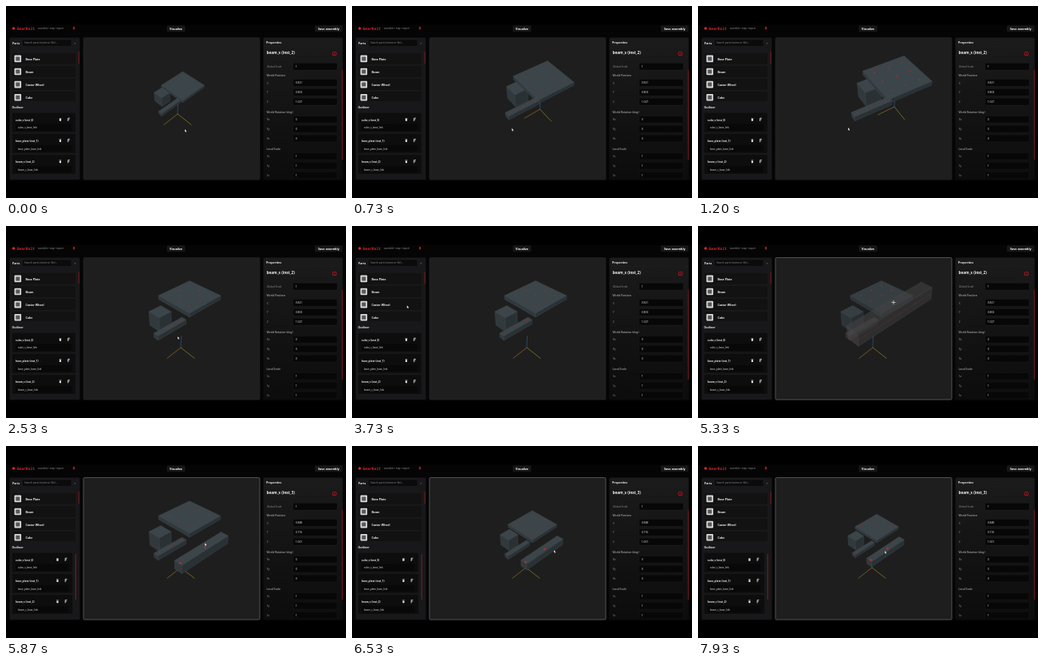
Recreate the animation shown at these times as an HTML page. Size 426 by 240 pixels, loop 8000 ms.

```html
<!DOCTYPE html>
<html lang="en">
<head>
<meta charset="utf-8">
<title>Assembly editor</title>
<style>
html, body { margin: 0; width: 100%; height: 100%; overflow: hidden; background: #000; }
svg { display: block; width: 100vw; height: 100vh; font-family: "Noto Sans", "Open Sans", sans-serif; }
</style>
</head>
<body>
<svg viewBox="0 0 426 240">
  <defs>
    <linearGradient id="panel" x2="0" y2="1">
      <stop stop-color="#1b1b1c"/><stop offset="1" stop-color="#0c0c0d"/>
    </linearGradient>
    <clipPath id="view"><rect x="97" y="39.5" width="221" height="177.5" rx="1.5"/></clipPath>
    <clipPath id="list"><rect x="5" y="56" width="88" height="63"/></clipPath>
    <clipPath id="side"><rect x="322" y="39" width="100" height="177"/></clipPath>
  </defs>
  <g id="ui"></g>
  <g id="outliner"></g>
  <g id="props"></g>
  <rect x="97" y="39.5" width="221" height="177.5" rx="1.5" fill="#1e1e1e"/>
  <g id="scene" clip-path="url(#view)"></g>
  <rect id="ring" x="97" y="39.5" width="221" height="177.5" rx="1.5" fill="none" stroke-width=".6"/>
  <g id="cursor"></g>
</svg>
<script>
const LOOP = 8000, DRAG = 3900, HOLD = 4670, DROP = 5800;
const RED = '#d3262e', BAR = '#7a1a20', MARK = '#c9202a';
const $ = id => document.getElementById(id);

const rect = (x, y, w, h, fill, rx = 1, extra = '') =>
  `<rect x="${x}" y="${y}" width="${w}" height="${h}" rx="${rx}" fill="${fill}" ${extra}/>`;
const text = (x, y, size, str, fill = '#e8e8e8', weight = 400, extra = '') =>
  `<text x="${x}" y="${y}" font-size="${size}" fill="${fill}" font-weight="${weight}" ${extra}>${str}</text>`;
const line = (a, b, stroke, w = 0.6) =>
  `<path d="M${a}L${b}" stroke="${stroke}" stroke-width="${w}" fill="none"/>`;
const dot = ([x, y], r, fill, alpha = 1) =>
  `<circle cx="${x}" cy="${y}" r="${r}" fill="${fill}" opacity="${alpha}"/>`;
const rim = color => `stroke="${color}" stroke-width=".3"`;
const MID = 'text-anchor="middle"';

function drawUi() {
  let s = rect(0, 23.5, 426, 195, '#050505', 0);
  s += dot([9.5, 28], 1.7, RED);
  s += text(13.5, 29.8, 4.7, 'GearKnit', RED, 700, 'font-family="DejaVu Sans Mono, monospace"');
  s += text(40, 29.3, 2.75, 'assemble • snap • export', '#8d8d8d');
  s += `<path d="M84.2 26.4h1.8l-.4 1.5.7.7h-2.4l.6-.7zM85.1 28.6v1.6" fill="${RED}" stroke="${RED}" stroke-width=".4"/>`;
  s += rect(201.5, 24.3, 23, 8, '#171717', 1.5);
  s += text(213, 29.7, 3.6, 'Visualize', '#fff', 700, MID);
  s += rect(387, 24.3, 34.5, 8, '#171717', 1.5);
  s += text(404.3, 29.7, 3.7, 'Save assembly', '#fff', 700, MID);

  s += rect(4.5, 39.5, 88, 177.5, '#18181a', 1.5);
  s += text(8, 47.8, 3.5, 'Parts', '#eee', 700);
  s += rect(20.5, 42, 61.5, 8.3, '#0b0b0c', 1.5, rim('#2b2b2b'));
  s += text(23, 47.3, 3.15, 'Search parts (name or file)...', '#858585');
  s += text(86.5, 47.8, 3.6, '×', '#999', 400, MID);
  s += '<g clip-path="url(#list)">';
  ['Base Plate', 'Beam', 'Castor Wheel', 'Cube'].forEach((name, i) => {
    const y = 58.3 + i * 16.1;
    s += rect(7.5, y, 80, 15, '#121213', 1.5, rim('#222'));
    s += rect(10.5, y + 3.3, 8.6, 8.6, '#d8d8d8');
    s += rect(12.3, y + 5.1, 5, 5, '#55595c', 0.3);
    s += text(24.5, y + 9.3, 3.5, name, '#f0f0f0', 700);
  });
  s += '</g>' + rect(90.7, 57, 1, 15, BAR, 0.5);
  s += text(7.5, 128.2, 3.4, 'Outliner', '#eee', 700);
  s += rect(322.5, 39.5, 99.3, 177.5, 'url(#panel)', 1.5);
  $('ui').innerHTML = s;
}

function drawOutliner(placed) {
  const right = placed ? 83.5 : 87, x = right - 19;
  let s = '';
  ['cube_s', 'base_plate', 'beam_s'].forEach((name, i) => {
    const y = 133.4 + i * 26.2;
    s += rect(7.5, y, right - 7.5, 24.3, '#0d0d0e', 1.5, rim('#202020'));
    s += text(12, y + 10.1, 3.15, `${name} (inst_${i})`, '#e8e8e8', 600);
    s += rect(12, y + 14.2, right - 17, 8.2, '#080808', 1.2);
    s += text(15, y + 20, 3, name + '_base_link', '#dcdcdc', 500);
    s += rect(x - 1.1, y + 7.6, 2.2, 2.8, '#e4e4e4', 0.4) + rect(x - 1.4, y + 6.8, 2.8, 0.5, '#e4e4e4', 0);
    s += `<path d="M${x + 9.7} ${y + 10.6}v-3.8h2.3M${x + 9.7} ${y + 8.5}h1.8" fill="none" stroke="#e4e4e4" stroke-width=".8"/>`;
  });
  if (placed) s += rect(86.8, 135, 1.1, 57, BAR, 0.5);
  $('outliner').innerHTML = s;
}

function drawProps(placed) {
  const pos = placed ? ['0.848', '0.716', '1.001'] : ['0.821', '0.803', '1.027'];
  const field = (y, label, val) =>
    text(326.7, y + 1.4, 3.3, label, '#858585') +
    rect(359.8, y - 4.6, 55.2, 8.9, '#070707', 1.4, rim('#292929')) +
    text(362.8, y + 1.1, 3.3, val, '#e6e6e6', 500);
  const group = (y, title, prefix, vals) =>
    text(326.5, y + 1.2, 3.4, title, '#c4c4c4', 500) +
    vals.map((v, i) => field(y + 9.6 + i * 11.8, prefix + (prefix ? 'xyz' : 'XYZ')[i], v)).join('');
  let s = '<g clip-path="url(#side)">';
  s += text(326, 46.6, 3.7, 'Properties', '#eee', 700);
  s += rect(323, 50.3, 98, 0.3, '#242424', 0);
  s += text(326.5, 60.3, 4.7, `beam_s (inst_${placed ? 3 : 2})`, '#f2f2f2', 700);
  s += dot([411.5, 59.6], 2.7, RED) + dot([411.5, 59.6], 2.1, '#2a0a0c');
  s += line([411.5, 58.4], [411.5, 60.8], RED);
  s += field(75.8, 'Global Scale', '1');
  s += group(86.6, 'World Position', '', pos);
  s += group(132.4, 'World Rotation (deg)', 'R', ['0', '0', '0']);
  s += group(178.4, 'Local Scale', 'S', ['1', '1', '1']);
  s += rect(420.8, 80, 1, 112, BAR, 0.5) + '</g>';
  $('props').innerHTML = s;
}

// Motion
const clamp = u => Math.min(1, Math.max(0, u));
const part = (t, from, to) => clamp((t - from) / (to - from));
const ease = u => u * u * (3 - 2 * u);
const lerp = (a, b, u) => a + (b - a) * u;
const mix = (a, b, u) => a.map((v, i) => lerp(v, b[i], u));

// Plate centre x, y, scale, yaw, pitch
const VIEW = {
  far: [221.5, 99, 19, 45, 42],
  near: [249, 87.5, 31.5, 32, 39],
  work: [230, 87, 27.6, 45, 31],
  wide: [226, 98, 21.5, 45, 37]
};
const ORIGIN = { far: [215, 135], near: [246, 126], work: [219, 152], wide: [218, 152] };

function travel(stops, t) {
  const leg = (a, b, from, to) => mix(stops[a], stops[b], ease(part(t, from, to)));
  if (t < 1200) return leg('far', 'near', 0, 1200);
  if (t < DROP) return leg('near', 'work', 1200, 2500);
  return leg('work', 'wide', DROP, 6500);
}

function camera(t) {
  const [x, y, scale, yaw, pitch] = travel(VIEW, t);
  const z = 1 - 0.11 * ease(part(t, 6500, 7900));
  return [208 + (x - 208) * z, 125 + (y - 125) * z - 2 * (1 - z), scale * z, yaw, pitch];
}

const STOPS = [
  [0, 224, 154], [1200, 188, 152], [2530, 215, 138], [3300, 30, 82],
  [HOLD, 195.5, 156], [5330, 245, 95.5], [DROP, 249, 121], [6530, 253, 130], [7930, 234, 131]
];
function pointer(t) {
  const i = Math.max(1, STOPS.findIndex(k => k[0] > t));
  const [a, b] = t < 7930 ? [STOPS[i - 1], STOPS[i]] : STOPS.slice(-2);
  return mix(a, b, ease(part(t, a[0], b[0]))).slice(1);
}

// Projection
const rad = d => d * Math.PI / 180;
function lens(cx, cy, scale, yaw, pitch) {
  const sy = Math.sin(rad(yaw)), cyw = Math.cos(rad(yaw));
  const sp = Math.sin(rad(pitch)), cp = Math.cos(rad(pitch));
  return ([x, y, z]) => {
    const r = y * sy - x * cyw, h = x * sy + y * cyw;
    const k = scale / (1 - (h * cp + z * sp) * scale / 400);
    return [cx + k * r, cy + k * (h * sp - z * cp)];
  };
}

// The three faces turned to the viewer: one axis fixed at +1, two run round.
const FACES = [0, 1, 2].map(axis =>
  [[-1, -1], [1, -1], [1, 1], [-1, 1]].map(([u, v]) => {
    const p = [1, 1, 1];
    p[(axis + 1) % 3] = u;
    p[(axis + 2) % 3] = v;
    return p;
  }));
const SOLID = ['#31393d', '#2a3134', '#3c4549'];
const CLEAR = ['#464646', '#393939', '#414242'];
function box(proj, c, size, fills, stroke, alpha = 1) {
  return FACES.map((face, i) => {
    const pts = face.map(q => proj(q.map((v, j) => c[j] + v * size[j] / 2)));
    return `<polygon points="${pts.join(' ')}" fill="${fills[i]}" fill-opacity="${alpha}" stroke="${stroke}" stroke-width=".3" stroke-linejoin="round"/>`;
  }).join('');
}

const CUBE = [0.5, -1.58, -1.8], BEAM = [1.13, -0.1, -1.3], LONG = [0.25, 1.1, -1.3];
const LONG_SIZE = [3.05, 0.45, 0.45];

function drawGhost(t, [x, y]) {
  const u = part(t, HOLD, DROP);
  const g = lens(x - 1, y + 11, lerp(46, 28, u ** 3), 45, lerp(48, 31, u));
  const half = LONG_SIZE[0] / 2, side = LONG_SIZE[1] / 2;
  return box(g, [0, 0, 0], LONG_SIZE, CLEAR, '#484b4b', 0.6) +
    line(g([half, side, 0]), g([-half, side, 0]), '#7c2c31', 0.4) +
    line(g([half, -side, -side]), g([half, side, -side]), '#7c2c31', 0.4);
}

function drawScene(t) {
  const view = camera(t), proj = lens(...view);
  const dragging = t >= DRAG && t < DROP;
  const [ax, ay] = travel(ORIGIN, t), len = 24.5, yaw = rad(view[3]);
  const sn = Math.sin(yaw) * len, cs = Math.cos(yaw) * len;
  let s = line([ax, ay], [ax - cs, ay + sn * 0.78], '#a87f27');
  s += line([ax, ay], [ax + sn, ay + cs * 0.78], '#9c9d2b');
  s += line([ax, ay], [ax + 0.5, ay - len * 0.6], '#2c6596');

  const edge = '#4a5458', alpha = dragging ? 0.85 : 1;
  const marks = 0.8 * part(t, 200, 1000);
  const steps = [-1, 0, 1];
  s += box(proj, CUBE, [0.78, 0.78, 0.84], SOLID, edge, alpha);
  s += box(proj, [0, 0, -0.1], [2, 2, 0.2], SOLID, edge, alpha);
  for (const x of steps)
    for (const y of steps) s += dot(proj([x * 0.65, y * 0.65, 0]), view[2] / 36, MARK, marks);
  s += box(proj, BEAM, [1.72, 0.28, 0.24], SOLID, dragging ? '#8a2c32' : edge, alpha);
  for (const d of steps)
    s += dot(proj([BEAM[0] + d * 0.65, BEAM[1], BEAM[2] + 0.12]), view[2] / 42, MARK, marks);

  const at = pointer(t);
  if (t >= DROP) {
    s += box(proj, LONG, LONG_SIZE, SOLID, edge);
    for (const d of [-0.15, 1.4])
      s += dot(proj([LONG[0] + d, LONG[1], LONG[2] + 0.15]), 1.3, RED, 0.85);
  }
  if (dragging) s += drawGhost(t, at);
  $('scene').innerHTML = s;
  $('ring').setAttribute('stroke', t >= DRAG ? '#7a7a7a' : '#232323');

  $('cursor').setAttribute('transform', `translate(${at})`);
  $('cursor').innerHTML = dragging
    ? '<path d="M-2.5 0h5M0-2.5v5" stroke="#eee" stroke-width=".65"/>'
    : '<path d="M0 0v3.5l.8-.7.6 1.2.6-.3-.6-1.1h1.1z" fill="#fff" stroke="#222" stroke-width=".2"/>';
}

let shown = null;
function render(t) {
  const placed = t >= DROP;
  if (placed !== shown) {
    drawOutliner(placed);
    drawProps(placed);
    shown = placed;
  }
  drawScene(t);
}

drawUi();
render(0);
const start = performance.now();
function tick() {
  render(Math.max(0, performance.now() - start) % LOOP);
  requestAnimationFrame(tick);
}
requestAnimationFrame(tick);
</script>
</body>
</html>
```
